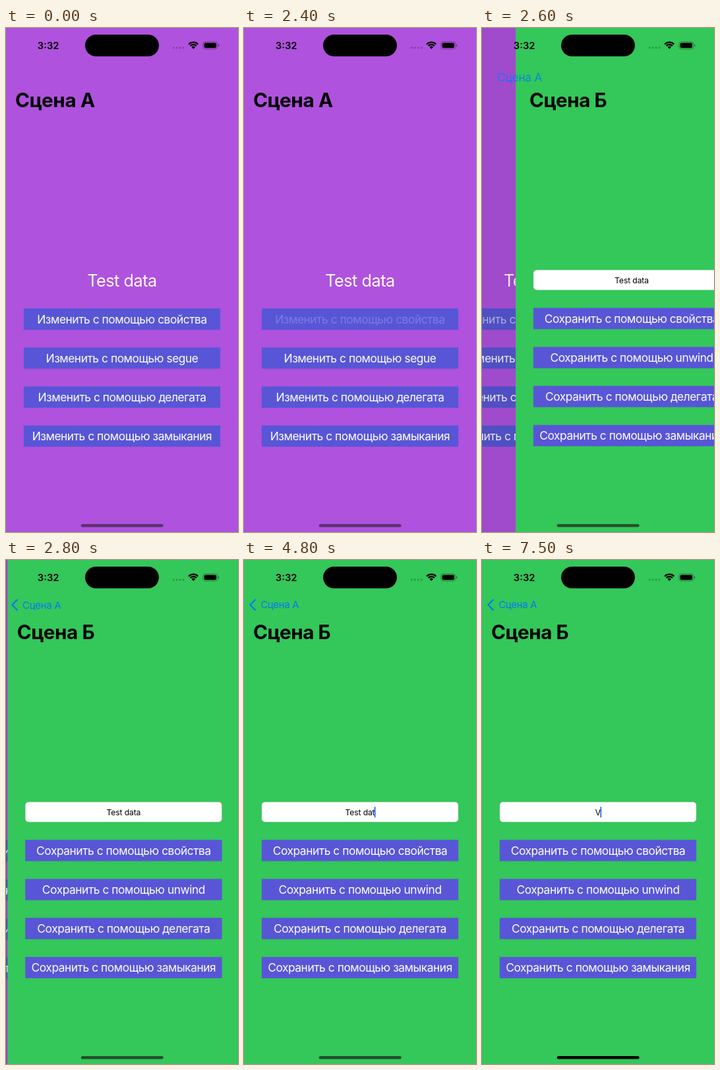
Write an HTML page with a canvas that moves like this. It is 352x764 px and loops after 8 s.

```html
<!DOCTYPE html>
<html lang="ru">
<head>
<meta charset="utf-8">
<title>Сцены</title>
<style>
html, body { margin: 0; width: 100%; height: 100%; overflow: hidden; }
canvas { display: block; width: 352px; height: 764px; }
</style>
</head>
<body>
<canvas id="stage"></canvas>
<script>
const W = 352, H = 764, LOOP = 8000, STEP = 100;
const PURPLE = '#af52de', GREEN = '#34c759', INDIGO = '#5856d6', BLUE = '#007aff';
const SPRING = 18.26;
const FIELD_TEXT = 'Test data';
const METHODS_A = ['свойства', 'segue', 'делегата', 'замыкания'];
const METHODS_B = ['свойства', 'unwind', 'делегата', 'замыкания'];

const canvas = document.getElementById('stage');
const ctx = canvas.getContext('2d');
const ratio = window.devicePixelRatio || 1;
canvas.width = W * ratio;
canvas.height = H * ratio;

const clamp = v => Math.max(0, Math.min(1, v));
const mix = (a, b, p) => a + (b - a) * p;

// Critically damped spring from 0 to 1
function spring(ms) {
  const x = SPRING * Math.max(0, ms) / 1000;
  return 1 - (1 + x) * Math.exp(-x);
}

function box(x, y, w, h, r, color) {
  ctx.fillStyle = color;
  ctx.beginPath();
  ctx.roundRect(x, y, w, h, r);
  ctx.fill();
}

// Draws text whose capitals are centred on y; returns its width
function label(text, x, y, size, { color = '#000', weight = 400, align = 'left', track = -0.013, alpha = 1 } = {}) {
  ctx.save();
  ctx.font = `${weight} ${size}px Inter, sans-serif`;
  ctx.letterSpacing = `${size * track}px`;
  ctx.textAlign = align;
  ctx.fillStyle = color;
  ctx.globalAlpha = alpha;
  ctx.fillText(text, x, y + size * 0.36);
  const width = ctx.measureText(text).width;
  ctx.restore();
  return width;
}

function buttons(verb, methods, top, firstAlpha) {
  methods.forEach((method, i) => {
    const y = top + i * 59.12;
    box(26.8, y, 298.4, 32.3, 0, INDIGO);
    label(`${verb} с помощью ${method}`, 176, y + 16.3, 17.4,
      { color: '#fff', align: 'center', track: -0.027, alpha: i ? 1 : firstAlpha });
  });
}

function sceneA(t, push) {
  ctx.save();
  ctx.translate(-0.3 * W * push, 0);
  ctx.fillStyle = PURPLE;
  ctx.fillRect(0, 0, W * 1.3, H);
  label(FIELD_TEXT, 176, 382.6, 25.2, { color: '#fff', align: 'center', track: -0.018 });
  const tapped = t < 2400 ? 1 : mix(0.22, 1, clamp((t - 2400) / 400));
  buttons('Изменить', METHODS_A, 425.1, tapped);
  ctx.restore();
  ctx.fillStyle = `rgba(0,0,0,${0.1 * push})`;
  ctx.fillRect(0, 0, W, H);
}

function fieldText(t) {
  if (t >= 7400) return 'V';
  if (t < 4800) return FIELD_TEXT;
  const left = t < 5100 ? 8 : 7 - Math.floor((t - 5100) / 100);
  return FIELD_TEXT.slice(0, Math.max(0, left));
}

function caretAlpha(t) {
  if (t < 3800) return 0;
  const lastKey = t < 4800 ? 3800 : t < 5900 ? t : t < 7400 ? 5900 : 7400;
  const idle = t - lastKey;
  if (idle < 700 || idle >= 1100) return 1;
  return idle < 800 || idle >= 1000 ? 0.5 : 0;
}

function sceneB(t, push) {
  ctx.save();
  ctx.translate(W * (1 - push), 0);
  ctx.fillStyle = GREEN;
  ctx.fillRect(0, 0, W, H);
  box(26.8, 366.7, 298.4, 30.6, 5, '#cfd8d1');
  box(27.4, 367.3, 297.2, 29.4, 4.5, '#fff');
  const width = label(fieldText(t), 176, 382.2, 12.2, { align: 'center' });
  ctx.globalAlpha = caretAlpha(t);
  box(176 + width / 2 - 0.7, 374, 1.8, 16.4, 0.9, '#1f6cf0');
  ctx.globalAlpha = 1;
  buttons('Сохранить', METHODS_B, 424.3, 1);
  ctx.restore();
}

function navigation(p) {
  // The large title shrinks into the back button
  const x = mix(14, 25.2, p), y = mix(109, 68, p), size = mix(29.7, 14.8, p);
  label('Сцена А', x, y, size, { weight: 700, alpha: clamp(1 - 1.6 * p) });
  if (p <= 0) return;
  label('Сцена А', x, y, size, { color: BLUE, alpha: p });
  label('Сцена Б', 14 + W * (1 - p), 109, 29.6, { weight: 700 });
  ctx.save();
  ctx.globalAlpha = clamp((p - 0.84) / 0.15);
  ctx.strokeStyle = BLUE;
  ctx.lineWidth = 2.2;
  ctx.lineCap = ctx.lineJoin = 'round';
  ctx.beginPath();
  ctx.moveTo(17, 60.3);
  ctx.lineTo(9.3, 68);
  ctx.lineTo(17, 75.7);
  ctx.stroke();
  ctx.restore();
}

function wifi(x, y) {
  const from = -Math.PI * 0.75, to = -Math.PI * 0.25;
  ctx.strokeStyle = ctx.fillStyle = '#000';
  ctx.lineWidth = 2.2;
  for (const r of [10.1, 6.6]) {
    ctx.beginPath();
    ctx.arc(x, y, r, from, to);
    ctx.stroke();
  }
  ctx.beginPath();
  ctx.moveTo(x, y);
  ctx.arc(x, y, 4, from, to);
  ctx.fill();
}

function statusBar() {
  label('3:32', 64.2, 26.4, 14.8, { weight: 600, align: 'center', track: 0 });
  box(120, 9.9, 112, 33.1, 16.55, '#000');
  for (let i = 0; i < 4; i++) box(253 + i * 4.9, 28.6, 2.8, 2.8, 1.4, 'rgba(0,0,0,.25)');
  wifi(284.3, 31.8);
  ctx.strokeStyle = 'rgba(0,0,0,.38)';
  ctx.lineWidth = 0.9;
  ctx.beginPath();
  ctx.roundRect(298.9, 20.9, 22, 11, 3.6);
  ctx.stroke();
  box(300.6, 22.6, 18.6, 7.6, 2.2, '#000');
  box(322, 24.6, 1.2, 3.6, 0.6, 'rgba(0,0,0,.4)');
}

function homeIndicator(t, push) {
  const p = clamp((t - 5100) / 500);
  const shade = mix(30, 0, p);
  const alpha = mix(mix(0.58, 0.72, push), 1, p);
  box(113.7, 752, 125, 4.6, 2.3, `rgba(${shade},${shade},${shade},${alpha})`);
}

function draw(now) {
  const t = Math.floor((now % LOOP) / STEP) * STEP;
  const push = spring(t - 2413);
  ctx.setTransform(ratio, 0, 0, ratio, 0, 0);
  ctx.clearRect(0, 0, W, H);
  sceneA(t, push);
  if (push > 0) sceneB(t, push);
  navigation(spring(t - 2422));
  statusBar();
  homeIndicator(t, push);
}

let start;
function tick(now) {
  start ??= now;
  draw(now - start);
  requestAnimationFrame(tick);
}
draw(0);
requestAnimationFrame(tick);
</script>
</body>
</html>
```
